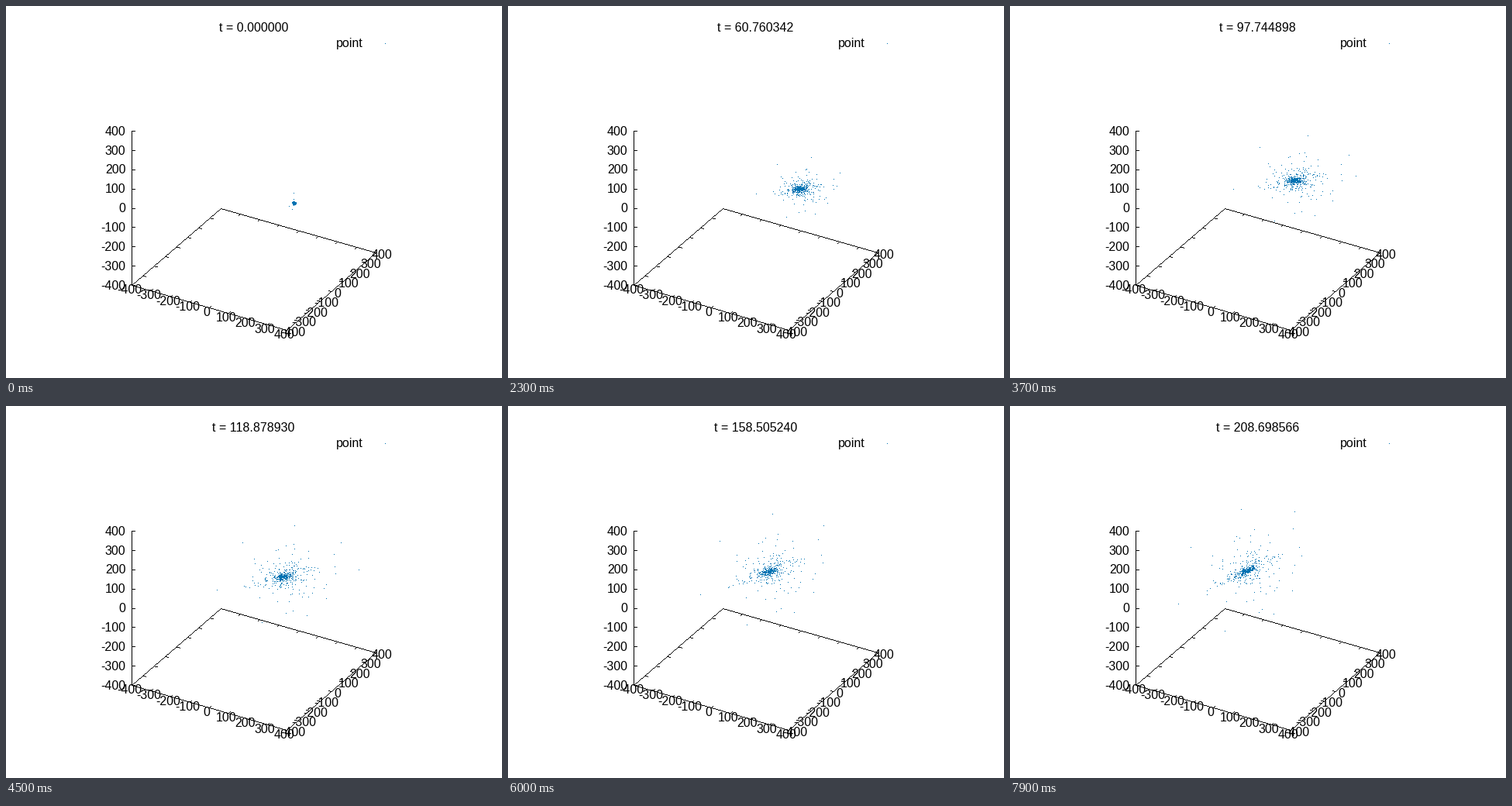
Write a matplotlib script that moves like this. It is 640x480 px and loops after 8 s.

```python
import numpy as np
import matplotlib
import matplotlib.pyplot as plt
from matplotlib.animation import FuncAnimation

matplotlib.rcParams["font.family"] = "Liberation Sans"

W, H, DPI = 640, 480, 100
FRAMES, INTERVAL = 80, 100
DT = 2.641754
OMEGA = 0.011
BLUE = "#0072b2"

fig = plt.figure(figsize=(W / DPI, H / DPI), dpi=DPI, facecolor="white")
ax = fig.add_axes([0, 0, 1, 1])
ax.set_xlim(0, W)
ax.set_ylim(H, 0)
ax.axis("off")


def snap(p):
    # Lands inside the pixel that the "," marker fills
    return np.floor(np.asarray(p, float) + 0.5).T + 0.2


def line(a, b):
    # One-pixel line without smoothing
    n = int(np.ceil(np.abs(np.subtract(b, a)).max())) + 1
    x, y = snap(np.linspace(a, b, n))
    ax.plot(x, y, ",", color="black")


def label(x, y, s, ha="center"):
    return ax.text(x, y, s, ha=ha, va="baseline", size=16 * 72 / DPI, color="black")


# Box base and vertical axis
left, back, right, front = np.array([[162, 361], [277, 262], [477, 319], [362, 419]])
for a, b in [(left, back), (back, right), (right, front), (front, left)]:
    line(a, b)
line(left, (162, 162))

x_tick = np.array([2, -2])
y_tick = np.array([-4, -1])
for i, value in enumerate(range(-400, 401, 100)):
    k = i / 8
    on_front = left + k * (front - left)
    on_back = back + k * (right - back)
    on_right = front + k * (right - front)
    on_left = left + k * (back - left)
    line(on_front, on_front + x_tick)
    line(on_back, on_back - x_tick)
    line(on_right, on_right + y_tick)
    line(on_left, on_left - y_tick)
    z = 361 - 199 * k
    line((162, z), (166, z))
    label(154.5, z + 4.7, str(value), "right")
    label(on_front[0] - 3, on_front[1] + 10, str(value))
    label(on_right[0] + 8, on_right[1] + 6.7, str(value))

title = label(319.4, 33, "")
label(460.3, 53, "point", "right")
ax.plot(*snap([[489, 49]]), ",", color=BLUE)

rng = np.random.default_rng(7)


def stars(radius, spin):
    # Polar places around the cluster centre: radius, angle, turning rate
    n = len(radius)
    return radius, rng.uniform(0, 2 * np.pi, n), rng.normal(*spin, n)


core = stars(np.abs(rng.normal(0, 1.1, 210)), (0.05, 0.03))
halo = stars(np.minimum(rng.exponential(0.45, 230), 1.8), (0, 0.0012))
stream = stars(rng.uniform(0.1, 1, 80), (0, 0.001))
strays = rng.normal(0, 5, (4, 2))


def place(group, t, long_axis, short_axis):
    r, angle, spin = group
    a = angle + spin * t
    return np.outer(r * np.cos(a), long_axis) + np.outer(r * np.sin(a), short_axis)


def centre(t):
    # Tilted orbit around the middle of the box
    return np.array([320 + 57.5 * np.cos(OMEGA * (t - 42)),
                     241 - 28.5 * np.cos(OMEGA * (t - 190))])


def runaway(t):
    # Escapes from the cluster and is dropped when far out
    if t > 120:
        return np.empty((0, 2))
    return np.array([[370 + 1.08 * t - 0.0031 * t * t, 254 - 0.352 * t]])


def cluster(t):
    grow = np.sin(min(OMEGA * t, np.pi / 2))
    tilt = np.clip((t - 90) / 115, 0, 1)
    wide = 1.5 + 48 * grow
    high = 1.5 + (34 + 6 * tilt) * grow
    return centre(t) + np.vstack([
        place(core, t, (1 + 5.5 * grow, -3.5 * tilt),
              (0.8 * tilt, 1 + 3 * grow * (1 - 0.6 * grow))),
        place(halo, t, (wide, -(4 + 18 * tilt) * grow), (10 * tilt, high)),
        place(stream, t, (wide, -(6 + 16 * tilt) * grow), (0, 1 + (14 - 8 * tilt) * grow)),
        strays,
    ])


dots, = ax.plot([], [], ",", color=BLUE)


def update(i):
    t = i * DT
    title.set_text(f"t = {t:.6f}")
    dots.set_data(*snap(np.vstack([cluster(t), runaway(t)])))
    return dots, title


anim = FuncAnimation(fig, update, frames=FRAMES, interval=INTERVAL, repeat=True)
plt.show()
```
